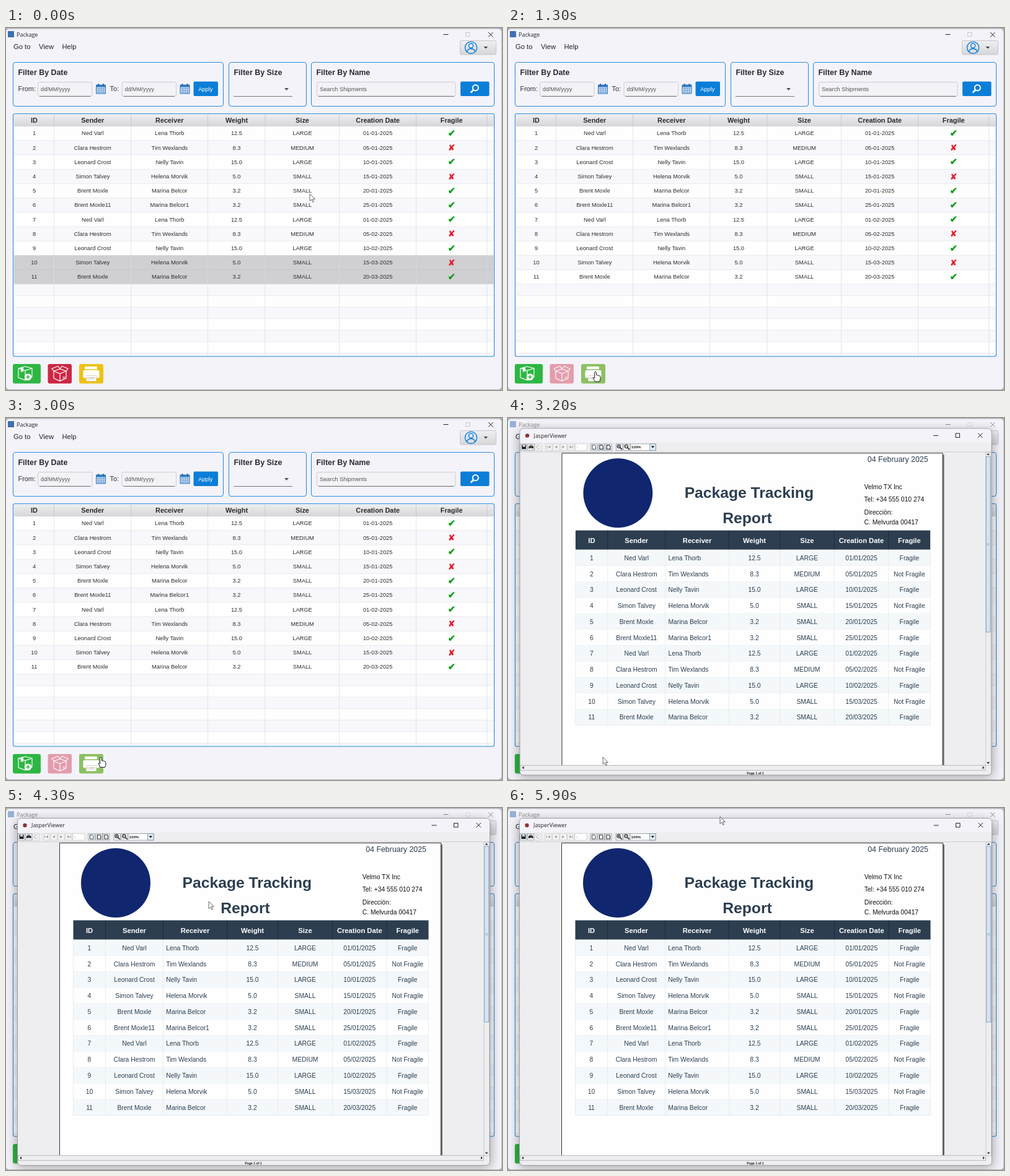
An HTML page for the animation above (6 s loop, 800 by 585 pixels).

```html
<!DOCTYPE html>
<html lang="en">
<head>
<meta charset="utf-8">
<title>Package</title>
<style>
  html, body { margin: 0; width: 100%; height: 100%; overflow: hidden; background: #f4f3f9; }
  svg { display: block; width: 100vw; height: 100vh; font-family: "Liberation Sans", Arial, sans-serif; }
  .ui { font-family: "Open Sans", sans-serif; }
  .mark { font-family: "DejaVu Sans", sans-serif; }
  #viewer { transform-origin: 400px 297px; }
</style>
</head>
<body>
<svg id="stage" viewBox="0 0 800 585"></svg>
<script>
const stage = document.getElementById('stage');
const BLUE = '#0b7ed8', NAVY = '#2c3e50';

const rect = (x, y, w, h, fill, more = '') =>
  `<rect x="${x}" y="${y}" width="${w}" height="${h}" fill="${fill}" ${more}/>`;
const path = (d, stroke, width = 1, more = 'fill="none"') =>
  `<path d="${d}" stroke="${stroke}" stroke-width="${width}" ${more}/>`;
const shape = (d, fill) => `<path d="${d}" fill="${fill}"/>`;
const circle = (x, y, r, fill, more = '') => `<circle cx="${x}" cy="${y}" r="${r}" fill="${fill}" ${more}/>`;
const text = (x, y, s, size, fill = '#2e2e30', more = '') =>
  `<text x="${x}" y="${y}" font-size="${size}" fill="${fill}" ${more}>${s}</text>`;
const MID = 'text-anchor="middle"', BOLD = 'font-weight="bold"', HEAD = MID + ' ' + BOLD;
const each = (n, f) => Array.from({ length: n }, (_, i) => f(i)).join('');

// Shipments
const kinds = [
  ['Ned Varl', 'Lena Thorb', '12.5', 'LARGE', true],
  ['Clara Hestrom', 'Tim Wexlands', '8.3', 'MEDIUM', false],
  ['Leonard Crost', 'Nelly Tavin', '15.0', 'LARGE', true],
  ['Simon Talvey', 'Helena Morvik', '5.0', 'SMALL', false],
  ['Brent Moxle', 'Marina Belcor', '3.2', 'SMALL', true],
];
const dates = '01-01 05-01 10-01 15-01 20-01 25-01 01-02 05-02 10-02 15-03 20-03'.split(' ');
const shipments = dates.map((date, i) => {
  const [from, to, weight, size, fragile] = kinds[i < 5 ? i : i === 5 ? 4 : i - 6];
  const copy = i === 5;
  return { cells: [i + 1, from + (copy ? '11' : ''), to + (copy ? '1' : ''), weight, size, date + '-2025'], fragile };
});
const heads = ['ID', 'Sender', 'Receiver', 'Weight', 'Size', 'Creation Date', 'Fragile'];

function titleBar() {
  return rect(3, 5, 10, 10, '#3f6fb5') +
    text(17, 14, 'Package', 9, '#222', 'class="ui"') +
    path('M705.5 10.5h8M778 7l7.5 7.5M785.5 7l-7.5 7.5', '#222') +
    path('M741.5 7.5h6.5v6h-6.5z', '#c4c4ca');
}

function menu() {
  return [[12, 'Go to'], [53, 'View'], [90.5, 'Help']].map(([x, s]) => text(x, 34.3, s, 11.2, '#222')).join('') +
    rect(732.5, 20.5, 58, 22.5, 'url(#grey)', 'rx="2" stroke="#c6c6ca"') +
    circle(750, 31.7, 9.6, 'none', `stroke="${BLUE}" stroke-width="1.4"`) +
    circle(750, 28.6, 3.6, 'none', `stroke="${BLUE}" stroke-width="1.4"`) +
    path('M743.5 38.3Q744.5 33.5 750 33.5T756.5 38.3', BLUE, 1.4) +
    shape('M770.5 30h6.6l-3.3 3.5z', '#444');
}

const field = (x, w, hint, size) =>
  rect(x + .5, 87.5, w, 22.5, '#f3f2f6', 'rx="2" stroke="#cdcdd2"') +
  path(`M${x + 3} 110.5h${w - 5}`, '#77777c') + text(x + 5, 102.3, hint, size, '#555');

const calendar = x =>
  rect(x, 91.5, 16, 15, '#2a78c4', 'rx="1"') + rect(x + 1.3, 95.5, 13.4, 9.8, '#f4f3f9') +
  path(`M${x + 4} 90v3M${x + 12} 90v3`, '#1a5c9c', 1.6) +
  each(3, i => path(`M${x + 2.6} ${97.5 + i * 3}h11`, '#2a78c4', 1.8, 'stroke-dasharray="1.9 1.1"'));

function filters() {
  const panels = [[11.5, 339, 'Date'], [359.5, 125, 'Size'], [492.5, 295, 'Name']];
  return panels.map(([x, w, s]) =>
      rect(x, 55.5, w, 71, 'none', 'rx="4" stroke="#2f8fdc" stroke-width="1.1"') +
      text(x + 8, 76, 'Filter By ' + s, 12.4, '#2a2a2e', BOLD)).join('') +
    text(19.5, 102.3, 'From:', 10.9) + field(51, 87.5, 'dd/MM/yyyy', 8.9) + calendar(145) +
    text(167.5, 102.3, 'To:', 10.9) + field(186.5, 87.5, 'dd/MM/yyyy', 8.9) + calendar(280.5) +
    rect(302.5, 86.5, 39.5, 23.5, BLUE, 'rx="2"') + text(321.8, 102, 'Apply', 9.3, '#fff', MID) +
    path('M367 110.5h95', '#77777c') + shape('M449 97h7l-3.5 4z', '#555') +
    field(501, 223.5, 'Search Shipments', 9.3) +
    rect(733, 86.5, 46.5, 23.5, BLUE, 'rx="2"') +
    circle(757.3, 96.6, 4.6, 'none', 'stroke="#fff" stroke-width="2"') + path('M754 100l-4.5 4.5', '#fff', 2.6);
}

function table() {
  const centers = [45.5, 139.8, 263.8, 372, 478, 599.7, 718.7];
  const lines = [77.5, 201.5, 325.5, 418, 537.5, 661.5, 776];
  const rowY = i => 158.6 + 23.2 * i, emptyY = i => 413.8 + 18.6 * i;
  const band = (y, h, i) => rect(13, y, 773.5, h, i % 2 ? '#f8f7fb' : '#fefefe');
  const rule = y => path(`M13 ${y}h773.5`, '#ebebef');
  return '<g clip-path="url(#grid)">' +
    each(11, i => band(rowY(i), 23.2, i) + rule(rowY(i))) +
    each(7, i => band(emptyY(i), 18.6, i + 1) + rule(emptyY(i))) +
    `<g id="selection">${rect(13, rowY(9), 773.5, 46.4, '#d0cfd2')}${path(`M13 ${rowY(10)}h773.5`, '#c8c7ca')}</g>` +
    rect(13, 139, 773.5, 19.6, 'url(#grey)') + path('M13 158.5h773', '#cfcfd3', .7) +
    lines.map(x => path(`M${x} 140v18`, '#c9c9ce') + path(`M${x} 159v372`, '#dcdce0', .7)).join('') + '</g>' +
    heads.map((s, i) => text(centers[i], 153.2, s, 10.9, '#2a2a2e', HEAD)).join('') +
    shipments.map(({ cells, fragile }, r) => {
      const y = rowY(r) + 14.7, color = fragile ? '#0a9c16' : '#e01f30';
      return cells.map((s, i) => text(centers[i], y, s, 9.3, '#2e2e30', MID)).join('') +
        text(718.7, y + 1.7, fragile ? '✔' : '✘', fragile ? 15 : 13.5, color,
          `${MID} class="mark" stroke="${color}" stroke-width=".4"`);
    }).join('') +
    rect(11.5, 138.5, 776, 392.3, 'none', 'rx="3" stroke="#2f8fdc" stroke-width="1.1"');
}

function actions() {
  return rect(11, 543, 45, 31.5, '#2db742', 'rx="3"') +
    path('M20 550l11-3 11 3v14l-11 5-11-4zM20 550l11 3.5 11-3.5M31 553.5V569', '#fff', 1.2) +
    shape('M24 549l4-1v8l-2-1.5-2 2z', '#fff') + circle(35.5, 564, 5.6, '#fff') +
    path('M32.5 564h6M35.5 561v6', '#2db742', 1.5) +
    '<g id="remove">' + rect(67.5, 543, 38.5, 31.5, '#cc2743', 'rx="3"') +
    path('M87 551l-10 3.5V566l10 4.5 10-4.5v-11.5zM77 554.5l10 4 10-4M87 558.5v12M77 554.5l-3-4 10-4 3 4.5 3-4.5 10 4-3 4', '#fff', 1.2) +
    path('M91.5 563l4 4M95.5 563l-4 4', '#fff') + '</g>' +
    rect(118, 543, 39, 31.5, '#ecc217', 'id="print" rx="3"') +
    rect(127, 547, 20, 4.5, '#fff', 'rx="1"') + rect(124.5, 553, 26, 12.5, '#fff', 'rx="2"') +
    rect(129, 561, 17, 10, '#d8d6c8') + rect(130, 562, 15, 8, '#fff') +
    text(137.5, 568, 'COPY', 4.5, '#8b8b70', MID);
}

function toolbar() {
  const button = (x, on) => rect(x, 41.5, 10.5, 10.5, '#f4f4f4', `stroke="${on ? '#8c9aa8' : '#cfcfd3'}" stroke-width=".8"`);
  const arrow = (x, dir) => shape(`M${x + 2 * dir} 46.5l${-4 * dir}-2.5v5z`, '#a5a5ab');
  const lens = (x, sign) => circle(x, 45.5, 2.6, '#fff', 'stroke="#222" stroke-width="1.1"') +
    path(`M${x + 2} 47.5l3 3`, '#222', 1.6) + path(sign, '#222', .8);
  return [19.5, 31.5, 133, 145, 156.5, 174, 186].map(x => button(x, true)).join('') +
    [43, 60, 72, 84, 96].map(x => button(x, false)).join('') +
    rect(21.5, 43, 7, 7, '#222') + rect(23, 43.5, 4, 2.5, '#fff') +
    rect(33, 45, 7.5, 4, '#222') + rect(34.5, 43, 4.5, 2.5, '#777') + rect(34.5, 48, 4.5, 2.2, '#ddd') +
    path('M50.5 45a2.6 2.6 0 1 0 .3 2.5', '#aaa') +
    arrow(66, -1) + arrow(77, -1) + arrow(89, 1) + arrow(101, 1) + path('M62.5 44v5M104 44v5', '#a5a5ab') +
    rect(108, 41.5, 19, 10.5, '#fff', 'stroke="#cfcfd3" stroke-width=".8"') + text(110, 48.5, '1', 5.2, '#bbb') +
    [135.5, 147.5, 159].map((x, i) => path(`M${x} 43.5h4l1.5 1.5v5h-5.5z`, '#333', i ? 1.2 : .9, 'fill="#fff"')).join('') +
    lens(178.5, 'M177 45.5h3M178.5 44v3') + lens(190.5, 'M189 45.5h3') +
    rect(197, 41.5, 41, 10.5, '#fff', 'stroke="#8c9aa8" stroke-width=".8"') +
    text(198.5, 48.6, '100%', 6.2, '#222', BOLD) +
    rect(228.5, 41.5, 9.5, 10.5, '#e3edf7', 'stroke="#7a8a99" stroke-width=".8"') + shape('M230.5 45h5.5l-2.75 3.5z', '#222');
}

function report() {
  const edges = [108.5, 160.5, 253.5, 356.5, 438.5, 526.5, 614, 681.5];
  const center = i => (edges[i] + edges[i + 1]) / 2;
  const rowY = i => 213 + 25.78 * i;
  const contact = ['Velmo TX Inc', 'Tel: +34 555 010 274', 'Dirección:', 'C. Melvurda 00417'];
  return circle(177, 121, 56, '#10266f') +
    text(388.8, 129, 'Package Tracking', 24.7, NAVY, HEAD) +
    text(386, 170, 'Report', 24.7, NAVY, HEAD) +
    text(678, 71, '04 February 2025', 12.4, NAVY, 'text-anchor="end"') +
    contact.map((s, i) => text(574.7, [114.5, 135, 155.5, 172][i], s, 10.35, '#111')).join('') +
    rect(108.5, 181.5, 573, 31, NAVY) +
    heads.map((s, i) => text(center(i), 202, s, 11.2, '#fff', HEAD)).join('') +
    edges.slice(1, -1).map(x => path(`M${x} 181.5v31`, '#1f2d3b')).join('') +
    shipments.map(({ cells, fragile }, r) => {
      const y = rowY(r);
      const row = [...cells, fragile ? 'Fragile' : 'Not Fragile'];
      return rect(108.5, y, 573, 25.78, r % 2 ? '#fefefe' : '#f4f8fa') + path(`M108.5 ${y + 25.78}h573`, '#e4e9ed', .8) +
        row.map((s, i) => i === 2
          ? text(258.3, y + 16.8, s, 10.35, NAVY)
          : text(center(i), y + 16.8, i === 5 ? s.replaceAll('-', '/') : s, 10.35, NAVY, MID)).join('');
    }).join('') +
    edges.map(x => path(`M${x} 213v283.5`, '#e4e9ed', .8)).join('');
}

function viewer() {
  return rect(16, 20, 767, 562, '#000', 'rx="9" opacity=".3" style="filter:blur(9px)"') +
    rect(18.5, 16.5, 762, 561, '#eeeef0', 'rx="6" stroke="#9b9ba2"') +
    shape('M19 39V23q0-6 6-6H774q6 0 6 6V39z', '#f4f3f9') +
    circle(30.5, 28, 3.2, '#8e3434') + text(41, 31.2, 'JasperViewer', 8.95, '#222', 'class="ui"') +
    path('M686.5 28h8M722.5 24.5h6.5v6.5h-6.5zM758.5 24l7.5 7.5M766 24l-7.5 7.5', '#222') +
    toolbar() + path('M19 54.5h761', '#c6c6cb', .8) +
    rect(701, 59, 3, 502.5, '#777') + rect(87, 56.5, 614.5, 505, '#fefefe') +
    path('M86.5 561.5V56.5H701.5V561.5', '#333') + report() +
    rect(771, 55, 8.5, 507, '#eeeef0', 'stroke="#b5b9bf" stroke-width=".7"') +
    rect(771.7, 62, 7, 284, '#d6e4f2', 'stroke="#7295b8" stroke-width=".8"') +
    path('M773.5 203h3.5M773.5 205h3.5', '#7295b8', .7) +
    shape('M772.8 59.5h4.6l-2.3-2.8zM772.8 556.5h4.6l-2.3 2.8z', '#222') +
    rect(19.5, 561.7, 751, 8, '#eeeef0', 'stroke="#a9adb4" stroke-width=".8"') +
    shape('M25 563.2v4.6l-2.8-2.3zM766 563.2v4.6l2.8-2.3z', '#222') +
    text(399, 576, 'Page 1 of 1', 5.2, '#222', HEAD);
}

stage.innerHTML = `<defs>
    <linearGradient id="grey" x2="0" y2="1"><stop stop-color="#efeff1"/><stop offset="1" stop-color="#d7d7da"/></linearGradient>
    <clipPath id="grid">${rect(12, 139, 775, 391.5, '#000', 'rx="3"')}</clipPath>
  </defs>` +
  rect(0, 0, 800, 585, '#b4b4ba') + rect(0, 1.5, 799, 582.5, '#f4f3f9', 'rx="5"') +
  `<g id="title">${titleBar()}</g>` + menu() + filters() + table() + actions() +
  `<g id="viewer">${viewer()}</g><g id="cursor">` +
  path('M0 0V11.5L2.7 9l1.9 4.3 1.9-.8L4.6 8.4H8.3z', '#444', .8, 'id="arrow" fill="#fff"') +
  path('M-1.4 1.2Q0-.8 1.4 1.2V6Q2.7 5 3.7 6.4 5 5.6 6 7.2 7.6 6.6 8 8.2V12L6.6 16.5H-.6L-4 10.7Q-3.8 8.6-1.4 11z', '#222', 1, 'id="hand" fill="#fff"') + '</g>';

const get = id => document.getElementById(id);
const show = (id, on) => get(id).setAttribute('visibility', on ? 'visible' : 'hidden');

// Pointer stops: time, x, y
const stops = [[0, 490, 268], [500, 197, 562], [800, 196, 561], [1000, 143, 556], [1300, 141, 555], [2600, 141, 555],
  [3000, 153, 548], [3300, 153, 548], [4100, 325, 151], [4300, 327, 151], [5000, 327, 151], [5700, 341, 22], [5900, 342, 14]];

function pointer(t) {
  const i = Math.max(1, stops.findIndex(s => s[0] >= t));
  const [t0, x0, y0] = stops[i - 1], [t1, x1, y1] = stops[i];
  const p = (t - t0) / (t1 - t0), e = p * p * (3 - 2 * p);
  return [x0 + (x1 - x0) * e, y0 + (y1 - y0) * e];
}

function draw() {
  const t = Math.floor(performance.now() % 6000 / 100) * 100;
  const selected = t < 700, hover = t >= 1000 && t < 3100, open = t >= 3100;
  show('selection', selected);
  get('remove').setAttribute('opacity', selected ? 1 : .42);
  get('print').setAttribute('fill', hover ? '#8cc063' : '#ecc217');
  get('title').setAttribute('opacity', open ? .5 : 1);
  show('viewer', open);
  const p = Math.min(1, Math.max(0, (t - 3000) / 300));
  get('viewer').style.transform = `scale(${1 - .04 * (1 - p) ** 3})`;
  get('viewer').style.opacity = Math.min(1, p * 1.6);
  show('arrow', !hover);
  show('hand', hover);
  get('cursor').setAttribute('transform', `translate(${pointer(t)})`);
  requestAnimationFrame(draw);
}
draw();
</script>
</body>
</html>
```
